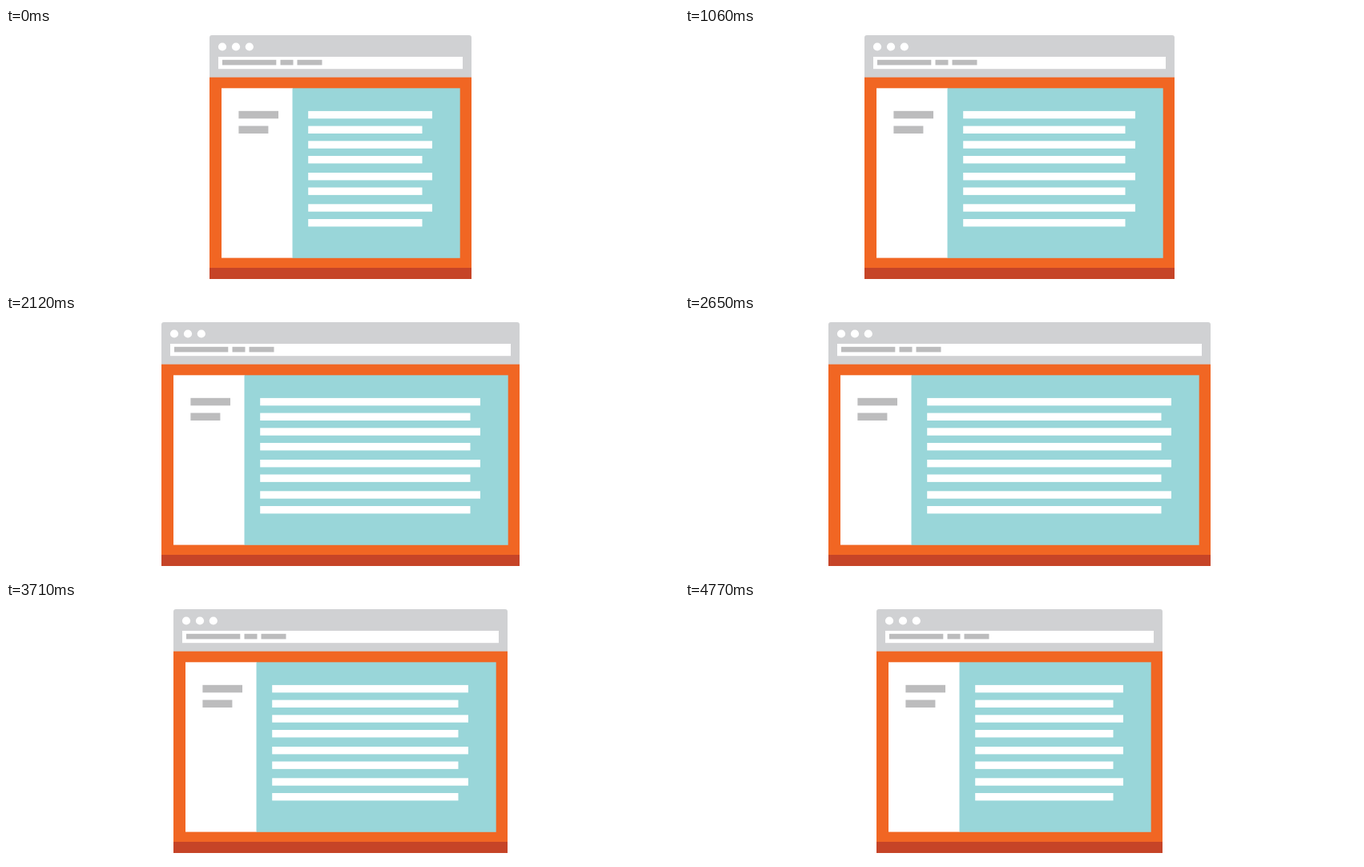
Recreate the animation shown at these times as an HTML page. Size 840 px wide and 324 px high, loop 5300 ms.

```html
<!DOCTYPE html>
<html lang="en">
<head>
<meta charset="utf-8">
<title>Resizing browser window</title>
<style>
  html, body { margin: 0; width: 100%; height: 100%; overflow: hidden; background: #fff; }
  svg { display: block; width: 840px; height: 324px; }
</style>
</head>
<body>
<svg id="stage" viewBox="0 0 840 324"></svg>
<script>
const LOOP = 5300, STEP = 530, GROW = 15;
const GREY = '#d0d1d3', BAR = '#bcbcbd', ORANGE = '#f16623',
      RED = '#c64427', TEAL = '#99d6d9', WHITE = '#fff';

const stage = document.getElementById('stage');
const stretchy = [];

function add(parent, tag, attrs) {
  const el = document.createElementNS('http://www.w3.org/2000/svg', tag);
  for (const key in attrs) el.setAttribute(key, attrs[key]);
  return parent.appendChild(el);
}

const page = add(stage, 'g', {});

function box(x, y, width, height, fill) {
  return add(page, 'rect', { x, y, width, height, fill });
}

// A box whose right edge follows the right edge of the window.
function wide(x, y, width, height, fill) {
  const el = box(x, y, width, height, fill);
  stretchy.push({ el, width });
  return el;
}

// Window frame; x is measured from its left edge.
wide(0, 9, 327, 60, GREY).setAttribute('rx', 3);
wide(0, 61.7, 327, 238.8, ORANGE);
wide(0, 300, 327, 14, RED);

// Title bar
for (const cx of [16, 33, 49.8]) add(page, 'circle', { cx, cy: 23.5, r: 5.1, fill: WHITE });
wide(11, 36, 305, 15.2, WHITE);
for (const [x, w] of [[16, 67.3], [88.5, 16], [109.5, 31]]) box(x, 39.8, w, 6.6, BAR);

// Sidebar and content
box(15, 75.3, 89, 212.3, WHITE);
wide(103.5, 75.3, 209.2, 212.5, TEAL);
box(36.4, 103.8, 49.6, 9.5, BAR);
box(36.4, 122.5, 37, 9.5, BAR);
[103.9, 122.6, 141.3, 160, 181, 199.5, 220.3, 239].forEach((y, i) =>
  wide(123.2, y, i % 2 ? 142.3 : 154.8, 9.4, WHITE));

function draw(time) {
  const k = Math.floor((time % LOOP) / STEP);
  const grow = GROW * Math.min(k, 10 - k);
  page.setAttribute('transform', `translate(${254 - grow} 0)`);
  for (const { el, width } of stretchy) el.setAttribute('width', width + 2 * grow);
}

const start = performance.now();
function tick() {
  draw(performance.now() - start);
  requestAnimationFrame(tick);
}
tick();
</script>
</body>
</html>
```
